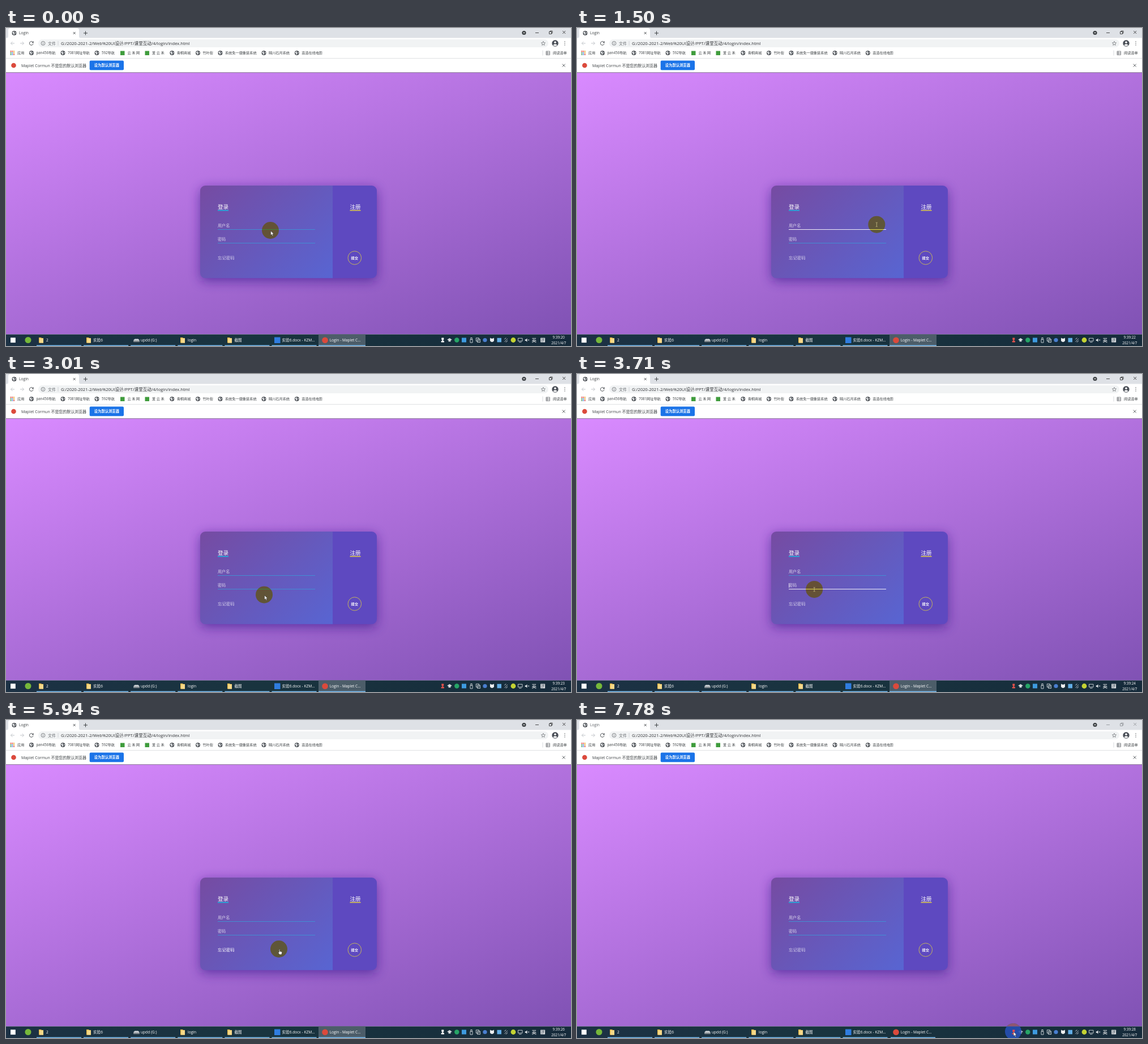
An HTML page that plays this animation: 998 px wide and 561 px high, repeating every 7.88 s.

```html
<!DOCTYPE html>
<html lang="zh-CN">
<head>
<meta charset="utf-8">
<title>Login</title>
<style>
html, body { margin: 0; width: 100%; height: 100%; overflow: hidden; background: #fff; }
svg { display: block; width: 998px; height: 561px; }
text { font-family: 'Open Sans', 'Noto Sans CJK SC', 'Noto Sans CJK', sans-serif; white-space: pre; }
#halo { mix-blend-mode: multiply; }
</style>
</head>
<body>
<svg id="stage" viewBox="0 0 998 561">
  <defs>
    <linearGradient id="sky" gradientUnits="userSpaceOnUse" x1="366.5" y1="-54.5" x2="631.5" y2="673.5">
      <stop stop-color="#d98aff"/><stop offset="1" stop-color="#8052b4"/>
    </linearGradient>
    <linearGradient id="panel" gradientUnits="userSpaceOnUse" x1="359.7" y1="261.2" x2="558.3" y2="459.8">
      <stop stop-color="#764ba2"/><stop offset="1" stop-color="#5865d2"/>
    </linearGradient>
    <linearGradient id="bar">
      <stop stop-color="#1c3144"/><stop offset=".45" stop-color="#19343f"/><stop offset="1" stop-color="#162b3b"/>
    </linearGradient>
    <filter id="blur" x="-30%" y="-50%" width="160%" height="200%"><feGaussianBlur stdDeviation="10"/></filter>
    <clipPath id="card"><rect x="343" y="278" width="312" height="163.5" rx="9"/></clipPath>
    <clipPath id="aboveBar"><rect y="500" width="998" height="40.5"/></clipPath>
  </defs>
</svg>
<script>
const stage = document.getElementById('stage');

function add(tag, attrs, parent = stage) {
  const el = document.createElementNS('http://www.w3.org/2000/svg', tag);
  for (const k in attrs) el.setAttribute(k, attrs[k]);
  return parent.appendChild(el);
}
const rect = (x, y, width, height, fill, more) => add('rect', { x, y, width, height, fill, ...more });
const disc = (cx, cy, r, fill, more) => add('circle', { cx, cy, r, fill, ...more });
const line = (d, stroke, w = 1, more) => add('path', { d, stroke, 'stroke-width': w, fill: 'none', ...more });
const shape = (d, fill, more) => add('path', { d, fill, ...more });
function label(x, mid, str, size, fill = '#3c4043', more) {
  const el = add('text', { x, y: mid + size * 0.37, 'font-size': size, fill, ...more });
  el.textContent = str;
  return el;
}
function globe(x, y) {
  disc(x, y, 4, '#4f5358');
  shape(`M${x - 2.8} ${y - 1.6}l2.3 -1.2l1.3 1l-1.6 1.5l1.8 .8l-1.2 2.4l-1.4 -.6l.2 -1.8l-1.8 -.6z`, '#eef0f2');
  shape(`M${x + 1.5} ${y - 1.2}l1.6 .3l-.2 1.6l-1.2 -.4z`, '#eef0f2');
}

// Tab strip
rect(0, 0, 998, 18, '#dee1e6');
shape('M1 18q3 0 3 -4v-10q0 -4 4 -4h117q4 0 4 4v10q0 4 3 4z', '#fff');
globe(14.5, 9);
const tabTitle = label(23, 9, 'Login', 6.7);
line('M118.7 7l4 4m0 -4l-4 4', '#3c4043', .9);
line('M137 9h7m-3.5 -3.5v7', '#3c4043', 1);
disc(915, 8.5, 3.6, '#3c4043');
shape('M913.2 7.7h3.6l-1.8 2z', '#fff');
const controls = line('M935 8.5h6M959.5 6.5h4v4h-4zM961 6.5v-1.3h4v4h-1.4M983.2 5l5 5m0 -5l-5 5', '#222', .8);

// Toolbar
rect(0, 17.5, 998, 61, '#fff');
line('M15 27h-6.5m3 -3l-3 3l3 3', '#bcc0c4', .9);
line('M25 27h6.5m-3 -3l3 3l-3 3', '#bcc0c4', .9);
line('M47.4 25a3.3 3.3 0 1 0 .6 2.6', '#4a4e52', 1);
shape('M48.7 23v3.2h-3.2z', '#4a4e52');
rect(57, 20, 901, 14, '#f1f3f4', { rx: 7 });
disc(65.5, 27, 3.4, 'none', { stroke: '#5f6368', 'stroke-width': .8 });
line('M65.5 26.6v2.3m0 -3.9v.8', '#5f6368', .8);
label(74, 27, '文件', 7, '#6b6f73');
line('M92 23v8', '#c0c3c7', .7);
label(97, 27, 'G:/2020-2021-2/Web%20UI设计/PPT/课堂互动/4/login/index.html', 7.6, '#303236');
line('M949 23.5l1 2.4l2.6 .2l-2 1.7l.6 2.6l-2.2 -1.4l-2.2 1.4l.6 -2.6l-2 -1.7l2.6 -.2z', '#5f6368', .7);
disc(970, 27, 5.7, '#4b5058');
disc(970, 25.2, 1.8, '#fff');
shape('M966.4 30.2q3.6 -4 7.2 0q-3.6 3 -7.2 0z', '#fff');
for (const y of [24, 27, 30]) disc(987, y, .7, '#4a4e52');

// Bookmarks
['#e0453a', '#e0453a', '#e8a82c', '#3f9a50', '#4a80dd', '#e8a82c', '#3f9a50', '#4a80dd', '#e0453a']
  .forEach((c, i) => rect(7.5 + i % 3 * 2.8, 40.2 + Math.floor(i / 3) * 2.8, 1.9, 1.9, c));
label(20, 44, '应用', 6.2);
[[45, 'pan456导航'], [100.5, '7081网址导航'], [160.5, '592导航'], [206, '云 禾 网', 1], [249.5, '爱 云 禾', 1],
 [293.3, '青桐商城'], [339, '竹叶街'], [378.5, '系统免一键重装系统'], [455.5, '晴川石月系统'], [513.8, '高清在线电影']]
  .forEach(([x, name, plain]) => {
    if (plain) rect(x - 4, 40.5, 7.5, 7.5, '#3f9c3c'); else globe(x, 44);
    label(x + 8.4, 44, name, 6.2);
  });
line('M948 39.5v9', '#c8cbd0', .7);
line('M954 41h6.5v6.5h-6.5zM954 43.2h6.5m-6.5 2.2h6.5M956 41v6.5', '#5f6368', .7);
label(966, 44, '阅读清单', 6.2);
line('M0 53.5h998', '#d9dbde', .8);

// Default-browser notice
disc(13.5, 66, 4.3, '#db4a3c');
label(27, 66, 'Maplet Cormun 不是您的默认浏览器', 6.95);
rect(147.7, 57.5, 60.3, 16.7, '#1a73e8', { rx: 2 });
label(177.9, 66, '设为默认浏览器', 6.3, '#fff', { 'text-anchor': 'middle', 'font-weight': 600 });
line('M982.7 63.5l5 5m0 -5l-5 5', '#4a4e52', .9);

// Page and login card
rect(0, 78.5, 998, 462, 'url(#sky)');
line('M0 78.6h998', '#8d8198', 1);
rect(343, 283, 312, 163.5, '#34148a', { rx: 9, opacity: .62, filter: 'url(#blur)' });
rect(343, 278, 235, 163.5, 'url(#panel)', { 'clip-path': 'url(#card)' });
rect(577, 278, 78, 163.5, '#5e49c0', { 'clip-path': 'url(#card)' });
label(374, 315, '登录', 9.6, '#fff');
rect(374, 321, 19, 1.6, '#20b4e0');
label(607.5, 315, '注册', 9.6, '#fff');
rect(607.5, 321, 19, 1.6, '#dcc94e');
const soft = { 'fill-opacity': .75 };
label(374, 348.7, '用户名', 7.1, '#fff', soft);
label(374, 372.3, '密码', 7.1, '#fff', soft);
const forgot = label(374, 405.5, '忘记密码', 7.4, '#fff');
const fields = [[355.5, 650, 1800], [379.5, 3250, 4050]].map(([y, from, to]) => ({
  from, to,
  rule: line(`M374 ${y}h172`, '#3f93d6', .9),
  caret: line(`M374.6 ${y - 10.5}v8`, '#fff', .7)
}));
disc(615.8, 405.5, 11.8, 'none', { stroke: '#c3b35e', 'stroke-width': 1 });
label(615.8, 405.5, '提交', 6.2, '#fff', { 'text-anchor': 'middle', 'font-weight': 600 });

// Taskbar
rect(0, 540.5, 998, 20.5, 'url(#bar)');
const activeTask = rect(552, 540.5, 83, 20.5, '#4c5d69');
rect(8, 546.3, 8.8, 8.8, '#fff');
disc(39, 550.5, 5.5, '#76b83a');
const folder = x => {
  shape(`M${x - 4} 546h4l1 1h3v8.5h-8z`, '#e9b94b');
  rect(x - 2.6, 547.5, 6.6, 8, '#f7d98a');
};
[62, 146, 312, 395].forEach(folder);
shape('M225.5 550.5l2 -2h6l2 2v3.5h-10z', '#cfd4d8');
rect(225.5, 551.5, 10, 2.6, '#7f878d');
rect(474, 545.5, 10.5, 10.5, '#2f7de0');
disc(563.5, 550.7, 5.3, '#db4a3c');
[[71, '2'], [154, '实验6'], [238, 'updd (G:)'], [321, 'login'], [403.5, '截图'], [487.5, '实验6.docx - KZM...'], [571.7, 'Login - Maplet C...']]
  .forEach(([x, s]) => label(x, 550.5, s, 6.6, '#fff'));
for (let i = 0; i < 6; i++) rect(54 + i * 83.1, 559.5, 79, 1.5, '#76b9ed');
const activeRule = rect(552, 559.5, 83, 1.5, '#76b9ed');

// Tray
const recorder = shape('M769.3 546.5h4v3.5h-1v2h1.6v2.4h-5.2v-2.4h1.6v-2h-1z', '#fff');
shape('M779 550l4.5 -3l4.5 3l-2.5 .8v2.5h-4v-2.5z', '#d8dcdf');
disc(796.3, 550.5, 4.2, '#27a567');
rect(805, 546.5, 8, 8, '#3e9be0');
line('M820 549.5h4v5.5h-4zM820.8 549.5v-3h2.4v3', '#e8ecee', .8);
line('M830.3 546.8h5v5.5h-5zM832.5 549h5v5.5h-5z', '#e8ecee', .8);
disc(846, 550.5, 3.6, '#4a7fd0');
shape('M855 546.5l2 1.2h3l2 -1.2v5.5q-3.5 4 -7 0z', '#eceeef');
rect(867.5, 546.8, 7.5, 7.5, '#62aee6');
line('M880.5 553.5l5.5 -5.5m-5 1.5q0 -2.5 2.5 -2.5m-1 7q3 0 3 -3', '#c4cacf', .9);
disc(896, 550.5, 4.4, '#c3d233');
line('M904.5 547.3h7.5v5h-7.5zM906 554.3h4.5', '#e8ecee', .8);
shape('M916.8 549.4h1.6l2 -2v6.4l-2 -2h-1.6z', '#e8ecee');
line('M921.6 549.2l2.6 2.6m0 -2.6l-2.6 2.6', '#e8ecee', .7);
label(928.5, 550.5, '英', 8.5, '#fff');
rect(944.3, 546.7, 7.8, 7.8, '#f2f4f5');
label(948.2, 550.5, '拼', 6.5, '#1a2d3c', { 'text-anchor': 'middle' });
const clock = label(976.3, 546, '', 6.3, '#fff', { 'text-anchor': 'middle' });
label(976.3, 555.3, '2021/4/7', 6.3, '#fff', { 'text-anchor': 'middle' });

// Pointer
const halo = disc(0, 0, 15, '#f5ee4a', { id: 'halo' });
const press = add('g', {});
add('circle', { cx: 770.5, cy: 549.5, r: 14.5, fill: '#2650b4', opacity: .9 }, press);
add('circle', { cx: 770.5, cy: 549.5, r: 14.5, fill: '#8f5670', 'clip-path': 'url(#aboveBar)' }, press);
add('path', { d: recorder.getAttribute('d'), fill: '#e8484a' }, press);
const outline = { stroke: '#222', 'stroke-width': .5 };
const pointers = {
  arrow: shape('M.6 1v7.6l1.8 -1.6l1.3 2.9l1.3 -.6l-1.3 -2.8h2.4z', '#fff', outline),
  beam: line('M-1.5 -3.5h1.2m.6 0h1.2M0 -3.3v6.8M-1.5 3.7h1.2m.6 0h1.2', '#cfc38a', .8),
  hand: shape('M.3 .8q1 -.9 1.4 .3v3l3 .7q1 .5 .8 1.6l-.7 3.4h-3.6l-2.4 -3.4q.3 -1.2 1.5 -.2z', '#fff', outline)
};

// time, x, y
const path = [
  [0, 467, 357], [150, 466, 357], [600, 420, 354], [909, 410, 355], [1200, 418, 353], [1650, 560, 345],
  [1850, 617, 312], [1950, 617, 312], [2121, 612, 339], [2400, 616, 398], [2700, 616, 403], [3210, 392, 384],
  [3350, 375, 370], [3500, 385, 372], [3737, 441, 385], [4030, 400, 392], [4300, 392, 404], [4747, 402, 353],
  [4900, 402, 342], [5100, 402, 343], [5500, 440, 395], [5959, 482, 404], [6450, 612, 404], [6700, 616, 403],
  [7250, 765, 538], [7450, 770.5, 549], [7880, 770.5, 549]
];
function locate(t) {
  const i = path.findIndex(p => p[0] > t);
  const [t0, x0, y0] = path[i - 1], [t1, x1, y1] = path[i];
  const u = (t - t0) / (t1 - t0), e = u * u * (3 - 2 * u);
  return [x0 + (x1 - x0) * e, y0 + (y1 - y0) * e];
}
function kindAt(x, y) {
  if (Math.hypot(x - 616, y - 405.5) < 12) return 'hand';
  if (x < 374 || x > 546) return 'arrow';
  if (y > 397 && y < 413) return 'hand';
  return (y > 342 && y < 356) || (y > 365 && y < 380) ? 'beam' : 'arrow';
}
const show = (el, on) => el.setAttribute('visibility', on ? 'visible' : 'hidden');
const ramp = (t, a, b) => Math.min(1, Math.max(0, (t - a) / (b - a)));

function draw(now) {
  const t = Math.floor((now % 7880 + 25) / 101) * 101 % 7880;
  const [x, y] = locate(t), kind = kindAt(x, y);
  const pressed = t >= 7600, focused = t < 7500;

  halo.setAttribute('cx', x);
  halo.setAttribute('cy', y);
  show(halo, !pressed);
  show(press, pressed);
  for (const k in pointers) {
    pointers[k].setAttribute('transform', `translate(${x} ${y})`);
    show(pointers[k], k === kind);
  }
  for (const f of fields) {
    const on = t >= f.from && t < f.to;
    f.rule.setAttribute('stroke', on ? '#fff' : '#3f93d6');
    show(f.caret, on && (t - f.from) % 1060 < 530);
  }
  const glow = Math.max(ramp(t, 4130, 4300) - ramp(t, 4600, 5000), ramp(t, 5450, 5700) - ramp(t, 6130, 6400));
  forgot.setAttribute('fill-opacity', .72 + .28 * glow);

  clock.textContent = '9:39:' + (20 + Math.floor((t + 630) / 1000));
  recorder.setAttribute('fill', Math.floor(t / 985) % 2 ? '#e0524c' : '#fff');
  tabTitle.setAttribute('fill', focused ? '#3c4043' : '#5f6368');
  controls.setAttribute('stroke', focused ? '#222' : '#8b8e92');
  show(activeTask, focused);
  activeRule.setAttribute('x', focused ? 552 : 554);
  activeRule.setAttribute('width', focused ? 83 : 79);
  requestAnimationFrame(loop);
}
const start = performance.now();
function loop() { draw(performance.now() - start); }
loop();
</script>
</body>
</html>
```
